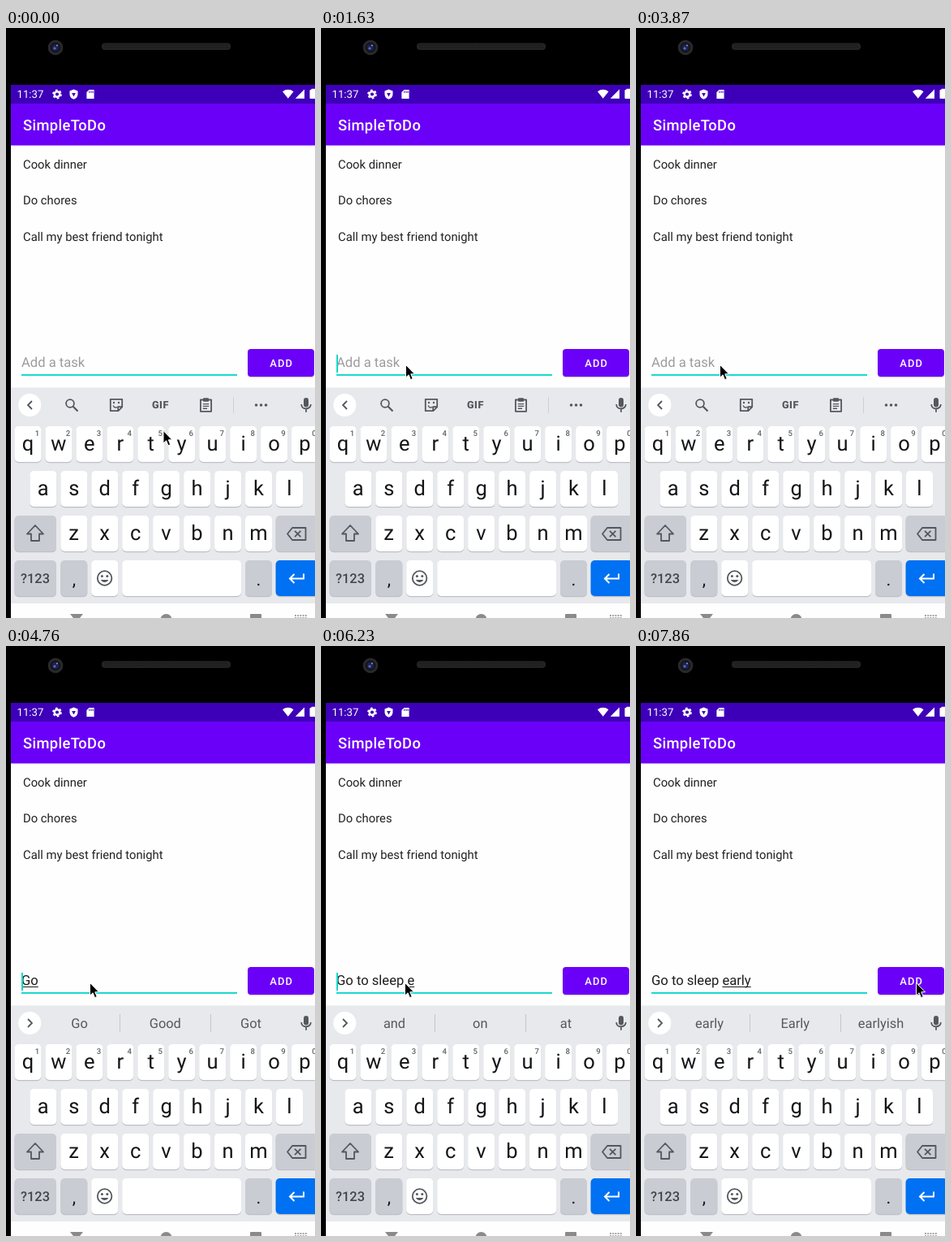
Write an HTML page that moves like this. It is 381x726 px and loops after 8 s.

```html
<!DOCTYPE html>
<html lang="en">
<head>
<meta charset="utf-8">
<title>To-do app</title>
<style>
  html, body { margin: 0; width: 381px; height: 726px; overflow: hidden; background: #000; }
  body { position: relative; font-family: Roboto, sans-serif; }
  svg { position: absolute; left: 0; top: 0; display: block; }
  text { white-space: pre; text-rendering: geometricPrecision; }
  .mid { text-anchor: middle; }
  .med { font-weight: 500; }
  .item { font-size: 14.8px; fill: #212121; }
  .letter { font-size: 25.5px; fill: #141517; text-anchor: middle; }
  .digit { font-size: 9.6px; fill: #5f6368; text-anchor: middle; font-weight: 500; }
  .tip { font-size: 16.4px; fill: #54585d; text-anchor: middle; }
  .line { fill: none; stroke: #54585d; stroke-width: 1.8; }
  #field, #hint {
    position: absolute; left: 19px; top: 402px; height: 22px;
    font-size: 16.6px; line-height: 22px; white-space: pre; color: #1d1d1d;
    text-rendering: geometricPrecision;
  }
  #hint { color: #9c9c9c; }
  #word { text-decoration: underline 1px; text-underline-offset: 2px; text-decoration-skip-ink: none; }
  #caret { position: absolute; top: 0; width: 1.8px; height: 22px; background: #0fd8cb; }
</style>
</head>
<body>
<svg id="stage" width="381" height="726" viewBox="0 0 381 726"></svg>
<div id="hint">Add a task</div>
<div id="field"><span id="done"></span><span id="word"></span><span id="tail"></span><i id="caret"></i></div>
<svg width="381" height="726" viewBox="0 0 381 726">
  <path id="mouse" d="M0 0V15.6L3.6 12.3 6 18.2 8.7 17.1 6.3 11.3H11Z" fill="#000" stroke="#fff" stroke-width="1" stroke-linejoin="round"/>
</svg>
<script>
const LOOP = 8000;
const PURPLE = '#6b00f8', GREY = '#54585d', KEY_GREY = '#c9ccd2';
const $ = id => document.getElementById(id);

const rect = (x, y, w, h, fill, r = 0) =>
  `<rect x="${x}" y="${y}" width="${w}" height="${h}" rx="${r}" fill="${fill}"/>`;
const dot = (x, y, r, fill) => `<circle cx="${x}" cy="${y}" r="${r}" fill="${fill}"/>`;
const path = (d, attrs) => `<path d="${d}" ${attrs}/>`;
const text = (x, y, cls, str, style = '') =>
  `<text x="${x}" y="${y}" class="${cls}" style="${style}">${str}</text>`;
const at = (x, y, body) => `<g transform="translate(${x} ${y})">${body}</g>`;

function hardware() {
  let s = rect(118, 18.5, 159, 8.5, '#242424', 4);
  s += path('M121 21H274M122 24H274', 'stroke="#111" stroke-width="1.2" stroke-dasharray="1.2 1.4"');
  s += dot(61, 24, 9.3, '#2a2a2c') + dot(61, 24, 6.5, '#15161f') + dot(61, 24, 4, '#1c2350');
  return s + dot(60, 25, 1.6, '#5a6cc8') + dot(63, 21.5, 1, '#98a0c8');
}

function statusBar() {
  const white = 'fill="#fff"';
  let s = rect(6, 70, 375, 23, '#3d00b8');
  s += text(13.5, 86.3, '', '11:37', 'font-size:13.2px;fill:#fff');
  s += at(63, 81.5,
    '<circle r="3.3" fill="none" stroke="#fff" stroke-width="2.4"/>' +
    '<circle r="5" fill="none" stroke="#fff" stroke-width="1.8" stroke-dasharray="2.6 2.636"/>');
  s += at(83.5, 81.5, path('M0-6L5-4V0C5 3 3 5.3 0 6.3-3 5.3-5 3-5 0V-4Z', white) +
    path('M-2.4-1.5H2.4L0 3Z', 'fill="#3d00b8"'));
  s += at(104, 81.5, path('M-1.5-5.5H4.6V5.5H-4.6V-2.4Z', white) +
    path('M-1.2-4V-1.6M1-4V-1.6M3.1-4V-1.6', 'stroke="#3d00b8"'));
  s += path('M341 78.3C345 75 350.5 75 354.5 78.3L347.8 86.8Z', white);
  s += path('M368 75.5V86.8H356.8Z', 'fill="#fff" fill-opacity=".35"');
  s += path('M368 75.5V86.8H356.8L363.5 80Z', white);
  return s + rect(374.5, 76, 8, 11, '#fff', 1) + rect(376.5, 74.8, 5, 2, '#fff');
}

function app() {
  let s = rect(6, 93, 375, 633, '#fefefe') + rect(6, 93, 375, 51.5, PURPLE);
  s += text(21, 126, 'med', 'SimpleToDo', 'font-size:18.4px;letter-spacing:.32px;fill:#fff');
  ['Cook dinner', 'Do chores', 'Call my best friend tonight']
    .forEach((item, i) => s += text(21, 172.5 + 44.8 * i, 'item', item));
  s += rect(19, 426, 266, 1.9, '#0fd8cb');
  s += rect(298, 396, 82, 34.3, '#d5d2da', 4) + rect(298, 395, 82, 34, PURPLE, 4);
  return s + text(339.6, 416.8, 'mid med', 'ADD', 'font-size:12.9px;letter-spacing:1.15px;fill:#fff');
}

function key(x, y, w, fill = '#fff') {
  return rect(x, y + 1.2, w, 44, '#bdc0c5', 5) + rect(x, y, w, 44, fill, 5);
}

function keyboard() {
  const pitch = 37.95;
  let s = rect(6, 442, 375, 1, '#f1f2f4') + rect(6, 443, 375, 265, '#e8e9ed');
  [['qwertyuiop', 10.5, 490], ['asdfghjkl', 29.4, 545], ['zxcvbnm', 67.3, 600]].forEach(([row, x0, y]) =>
    [...row].forEach((c, i) => {
      const x = x0 + pitch * i;
      s += key(x, y, 33) + text(x + 16.4, y + 29.7, 'letter', c);
      if (y === 490) s += text(x + 28, y + 11.5, 'digit', (i + 1) % 10);
    }));
  s += key(10.5, 600, 51.5, KEY_GREY) + key(332.6, 600, 52, KEY_GREY);
  s += key(10.5, 655, 51.5, KEY_GREY) + key(67.3, 655, 33, KEY_GREY) + key(105.2, 655, 33);
  s += key(143.2, 655, 146.8) + key(295, 655, 33, KEY_GREY) + key(332.6, 655, 52, '#0071f2');
  s += text(36, 682.8, 'mid med', '?123', 'font-size:16.4px;fill:#43464a');
  s += text(83.8, 686, 'letter', ',', 'font-size:22px') + text(311.3, 686, 'letter', '.', 'font-size:22px');
  s += at(36, 622, path('M0-10L10 0.5H5V9H-5V0.5H-10Z', 'class="line" stroke-linejoin="round"'));
  s += at(359, 622.5, path('M-12 0L-6-7.5H10.5V7.5H-6Z', 'class="line" stroke-linejoin="round"') +
    path('M-3-3.7L4.4 3.7M4.4-3.7L-3 3.7', 'class="line"'));
  s += at(121.6, 677, '<circle r="8.8" class="line"/>' + dot(-3.2, -2.6, 1.5, GREY) + dot(3.2, -2.6, 1.5, GREY) +
    path('M-4.7 2C-2.8 6 2.8 6 4.7 2Z', `fill="${GREY}"`));
  return s + path('M367 671.5V677.5H350.5M355.5 672L350 677.5L355.5 683',
    'fill="none" stroke="#fff" stroke-width="2"');
}

function navBar() {
  const c = '#8a8a8a';
  let s = path('M79 721H95L87 731Z', `fill="${c}"`) + dot(197.5, 728, 7, c) + rect(301, 721, 14, 14, c, 1);
  return s + path('M356 723H371M356 726H371', `stroke="${c}" stroke-width="1.6" stroke-dasharray="2 1.2"`);
}

function toolbar() {
  let s = path('M32 459L27 464L32 469', 'class="line"');
  s += at(81, 464, '<circle cx="-2" cy="-2" r="4.9" class="line"/>' + path('M1.7 1.7L7.5 7.5', 'class="line" style="stroke-width:2.2"'));
  s += at(136, 464, path('M-7.2-7.2H7.2V2.4L2.4 7.2H-7.2ZM7.2 2.2H2.2V7.2', 'class="line" stroke-linejoin="round"') +
    path('M-3.8 0.4C-3 3.6 0.5 3.6 1.5 2', 'class="line" style="stroke-width:1.4"') +
    dot(-3, -3, 1.2, GREY) + dot(3, -3, 1.2, GREY));
  s += text(190.4, 468.3, 'mid', 'GIF', `font-size:12.6px;font-weight:900;letter-spacing:.5px;fill:${GREY}`);
  s += at(246.5, 464, path('M-6.6-6.5H6.6V7.8H-6.6Z', 'class="line" stroke-linejoin="round"') +
    rect(-3.5, -8.8, 7, 4.5, GREY, 1) + path('M-3.7-1.4H3.7M-3.7 1.4H3.7M-3.7 4.3H1.5', 'class="line" style="stroke-width:1.4"'));
  s += rect(280, 454, 1, 20, '#cdd0d4');
  return s + [308.5, 314.5, 320.5].map(x => dot(x, 464, 1.8, GREY)).join('');
}

function suggestions() {
  let s = path('M27 459L32 464L27 469', 'class="line"');
  s += rect(140, 453, 1, 22, '#c3c6ca') + rect(252, 453, 1, 22, '#c3c6ca');
  return s + [90.5, 196.3, 302].map(x => text(x, 470.3, 'tip', '')).join('');
}

const mic = at(370, 464, rect(-3, -9, 6, 11.5, GREY, 3) +
  path('M-5.8-1C-5.8 6.2 5.8 6.2 5.8-1M0 4.5V8.7', 'class="line"'));

$('stage').innerHTML = hardware() + statusBar() + app() + keyboard() + navBar() +
  dot(29.3, 464, 14, '#fff') + mic +
  `<g id="tools">${toolbar()}</g><g id="tips">${suggestions()}</g>`;

// [ms, settled|underlined|rest, suggestions]
const typing = [
  [0, '', ''],
  [4470, '|G', ''],
  [4620, '|Go', 'Go Good Got'],
  [4760, '|Go| ', 'Go Good Got'],
  [4910, 'Go |t', 'to for and'],
  [5060, 'Go |to', 't to the'],
  [5210, 'Go to ', 'to To too'],
  [5350, 'Go to |sl', 's sleep the'],
  [5500, 'Go to |sle', 'sl sleep SL'],
  [5640, 'Go to |slee', 'sle sleep Sle'],
  [5790, 'Go to |sleep', 'slee sleep sleeping'],
  [5940, 'Go to sleep ', 'sleep Sleep sleeping'],
  [6230, 'Go to sleep |e', 'and on at'],
  [6380, 'Go to sleep |ea', 'e early every'],
  [6530, 'Go to sleep |ear', 'ea early easy'],
  [6680, 'Go to sleep |earl', 'ear early earlier'],
  [6830, 'Go to sleep |early', 'earl early earlier'],
  [6980, 'Go to sleep |early', 'early Early earlyish']
];
// [ms, x, y]
const pointer = [
  [0, 194, 495.5], [740, 190, 478], [890, 170, 415], [1030, 146, 350], [1180, 124, 312],
  [1330, 108, 345], [1480, 104, 395], [1630, 104.5, 414.5], [1770, 103.5, 414.5],
  [7130, 126, 417], [7280, 205, 419], [7430, 300, 418], [7570, 362, 416], [7720, 352, 415],
  [7860, 345.5, 414.5]
];
const blinks = [450, 1030, 1480, 1920, 2370, 2970, 3420, 3870, 4470, 7430];

const current = (steps, t) => steps.filter(s => s[0] <= t).pop();
const tipTexts = document.querySelectorAll('.tip');

function draw(t) {
  const [, typed, words] = current(typing, t);
  const [done, word = '', tail = ''] = typed.split('|');
  $('done').textContent = done;
  $('word').textContent = word;
  $('tail').textContent = tail;
  $('hint').style.display = typed ? 'none' : 'block';
  $('caret').style.display = blinks.filter(b => b <= t).length % 2 ? 'block' : 'none';

  $('tools').style.display = words ? 'none' : 'inline';
  $('tips').style.display = words ? 'inline' : 'none';
  words.split(' ').forEach((w, i) => tipTexts[i].textContent = w);

  const [, x, y] = current(pointer, t);
  $('mouse').setAttribute('transform', `translate(${x} ${y})`);
}

const start = performance.now();
function tick() {
  draw((performance.now() - start) % LOOP);
  requestAnimationFrame(tick);
}
tick();
</script>
</body>
</html>
```
